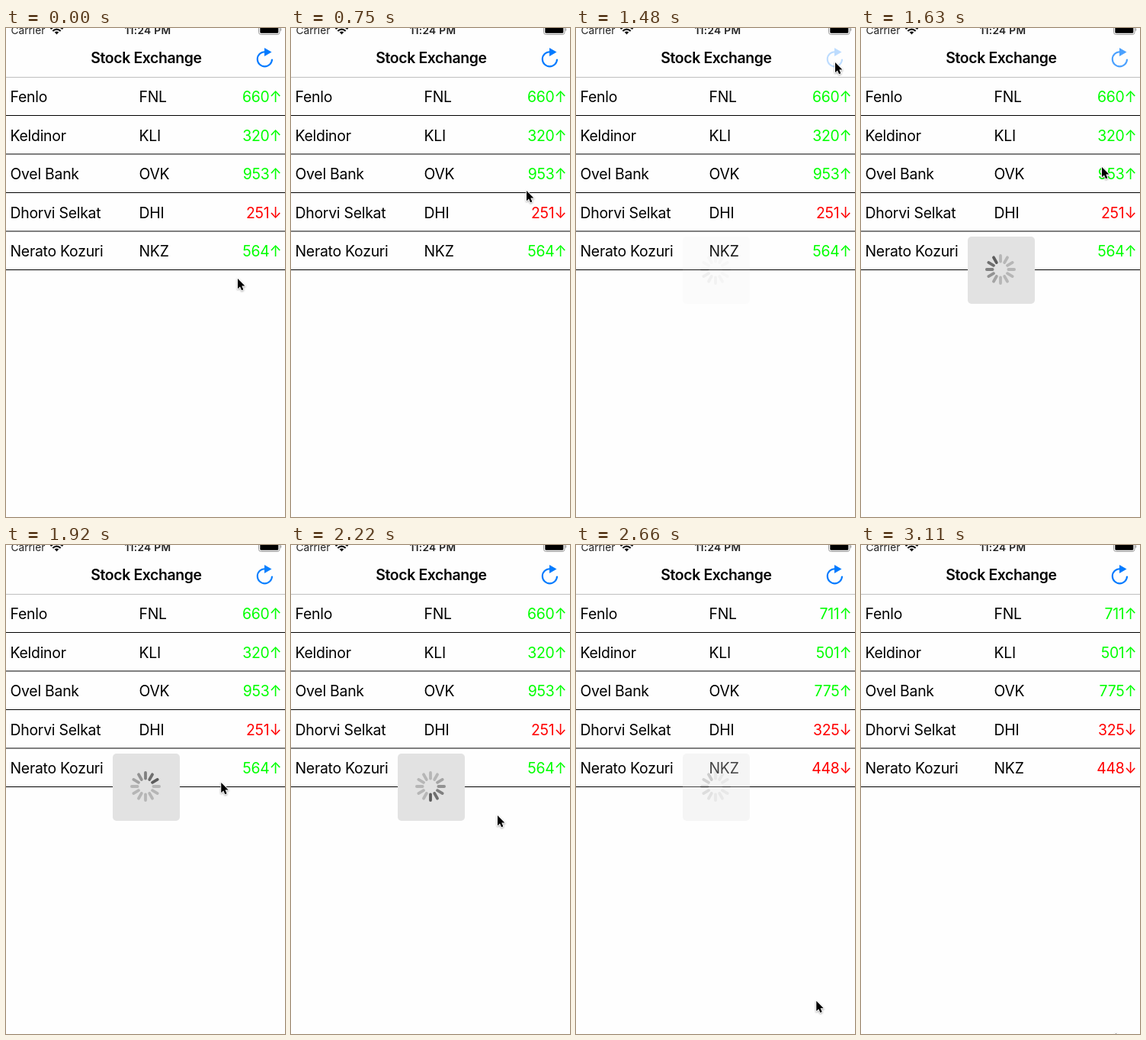
An HTML page that plays this animation: 366x640 px, repeating every 3.38 s.

```html
<!DOCTYPE html>
<html lang="en">
<head>
<meta charset="utf-8">
<title>Stock Exchange</title>
<style>
  html, body { margin: 0; width: 100%; height: 100%; overflow: hidden; background: #fefefe; }
  svg { display: block; width: 366px; height: 640px; }
  text { font: 400 19.4px Inter, "Liberation Sans", sans-serif; letter-spacing: -.25px; }
  .title { font-weight: 600; letter-spacing: -.36px; text-anchor: middle; }
  .status { font-size: 13.7px; letter-spacing: 0; fill: #222; }
  .clock { font-weight: 600; letter-spacing: .3px; text-anchor: middle; }
  .price { text-anchor: end; }
  .arrow { text-anchor: middle; letter-spacing: 0; }
  .up { fill: #0f0; }
  .down { fill: #f00; }
  #cursor { filter: drop-shadow(0 1px 1px rgba(0, 0, 0, .35)); }
</style>
</head>
<body>
<svg viewBox="0 0 366 640">
  <g id="statusBar">
    <text class="status" x="6.5" y="7.6">Carrier</text>
    <g fill="none" stroke="#111" stroke-width="2.2">
      <path d="M58.5 1.2Q66.5 -6 74.5 1.2M61.3 4Q66.5 -.6 71.7 4"/>
      <path d="M66.5 8.4L63.7 5.6Q66.5 3.4 69.3 5.6Z" fill="#111" stroke="none"/>
    </g>
    <text class="status clock" x="186" y="7.6">11:24 PM</text>
    <rect x="331.5" y="-5" width="27.5" height="13.5" rx="3" fill="none" stroke="#999"/>
    <rect x="333.3" y="-4" width="24" height="10.8" rx="1.5"/>
    <path d="M360 -.5Q362.5 2 360 4.5Z" fill="#999"/>
  </g>

  <text class="title" x="184" y="46.3">Stock Exchange</text>
  <g id="refresh" fill="#007aff">
    <path d="M349 40.8A9.6 9.6 0 1 1 339.4 31.2" fill="none" stroke="#007aff" stroke-width="2.1"/>
    <path d="M339 26L348.5 31.5L339 37Z"/>
  </g>
  <rect y="64" width="366" height="1" fill="#bfbfbf"/>

  <g id="rows"></g>

  <g id="hud">
    <rect x="140" y="273" width="88" height="88" rx="5" fill="#e2e2e2"/>
    <g id="spinner" transform="translate(183 316)"></g>
  </g>

  <path id="cursor" d="M0 0V13.2L3 10.4L5.1 15.2L7.4 14.2L5.3 9.5H9.4Z"
        stroke="#fff" stroke-width="1.8" stroke-linejoin="round" paint-order="stroke"/>
</svg>

<script>
const LOOP = 3380;
// The screen rests until START, then refreshes once per STEP.
const START = 747;
const STEP = 146.6;
const PRESS = 5;
const UPDATE = 13;
const SPOKES = 12;
const SPOKE_MS = 1000 / SPOKES;

const stocks = [
  { name: "Fenlo", code: "FNL", prices: ["660↑", "711↑"] },
  { name: "Keldinor", code: "KLI", prices: ["320↑", "501↑"] },
  { name: "Ovel Bank", code: "OVK", prices: ["953↑", "775↑"] },
  { name: "Dhorvi Selkat", code: "DHI", prices: ["251↓", "325↓"] },
  { name: "Nerato Kozuri", code: "NKZ", prices: ["564↑", "448↓"] },
];

// Where the hand settles; each move between stops eases out.
const stops = [
  { tick: -1, x: 304, y: 328 },
  { tick: 0, x: 309, y: 213 },
  { tick: 3, x: 340, y: 58 },
  { tick: PRESS, x: 340, y: 45 },
  { tick: 6, x: 316, y: 182 },
  { tick: 10, x: 271, y: 354 },
  { tick: 12, x: 292, y: 544 },
  { tick: 15, x: 334, y: 639 },
];

const $ = id => document.getElementById(id);
const clamp = v => Math.max(0, Math.min(1, v));
const mix = (a, b, k) => a + (b - a) * k;
const easeOut = k => 1 - (1 - k) ** 2;

function add(parent, tag, attrs, text = "") {
  const el = document.createElementNS("http://www.w3.org/2000/svg", tag);
  for (const key in attrs) el.setAttribute(key, attrs[key]);
  el.textContent = text;
  return parent.appendChild(el);
}

const cells = stocks.map(({ name, code }, i) => {
  const top = 50.5 * i;
  const y = 97 + top;
  add($("rows"), "text", { x: 5.5, y }, name);
  add($("rows"), "text", { x: 174.5, y }, code);
  add($("rows"), "rect", { y: 114 + top, width: 366, height: 1 });
  return {
    price: add($("rows"), "text", { x: 345.5, y }),
    arrow: add($("rows"), "text", { x: 353.5, y }),
  };
});

const spokes = Array.from({ length: SPOKES }, (_, i) =>
  add($("spinner"), "rect", {
    x: -1.9, y: -20, width: 3.8, height: 11.5, rx: 1.9,
    transform: `rotate(${i * 360 / SPOKES})`,
  }));

function drawCursor(tick) {
  const from = stops.findLast(stop => stop.tick <= tick);
  const to = stops.find(stop => stop.tick > tick) ?? from;
  const k = easeOut((tick - from.tick) / (to.tick - from.tick || 1));
  const x = mix(from.x, to.x, k);
  const y = mix(from.y, to.y, k);
  $("cursor").setAttribute("transform", `translate(${x} ${y})`);
}

function drawPrices(tick) {
  cells.forEach(({ price, arrow }, i) => {
    const text = stocks[i].prices[tick < UPDATE ? 0 : 1];
    const trend = text.endsWith("↑") ? "up" : "down";
    price.textContent = text.slice(0, -1);
    arrow.textContent = text.slice(-1);
    price.setAttribute("class", "price " + trend);
    arrow.setAttribute("class", "arrow " + trend);
  });
}

function drawSpinner(tick) {
  const head = Math.floor((START + tick * STEP) / SPOKE_MS - .2) + 4;
  spokes.forEach((spoke, i) => {
    const age = (head - i + SPOKES) % SPOKES;
    const grey = Math.min(182, 92 + age * 18);
    spoke.setAttribute("fill", `rgb(${grey},${grey},${grey})`);
  });
}

function drawFades(tick) {
  const hud = clamp(Math.min(tick - PRESS + .1, UPDATE + .3 - tick));
  const button = tick < PRESS ? 1 : 1 - .75 * .4 ** (tick - PRESS);
  $("hud").setAttribute("opacity", hud);
  $("refresh").setAttribute("opacity", button);
}

let shown;

function draw() {
  const time = performance.now() % LOOP;
  const tick = Math.max(-1, Math.floor((time - START) / STEP));
  if (tick !== shown) {
    shown = tick;
    for (const part of [drawCursor, drawPrices, drawSpinner, drawFades]) part(tick);
  }
  requestAnimationFrame(draw);
}
draw();
</script>
</body>
</html>
```
